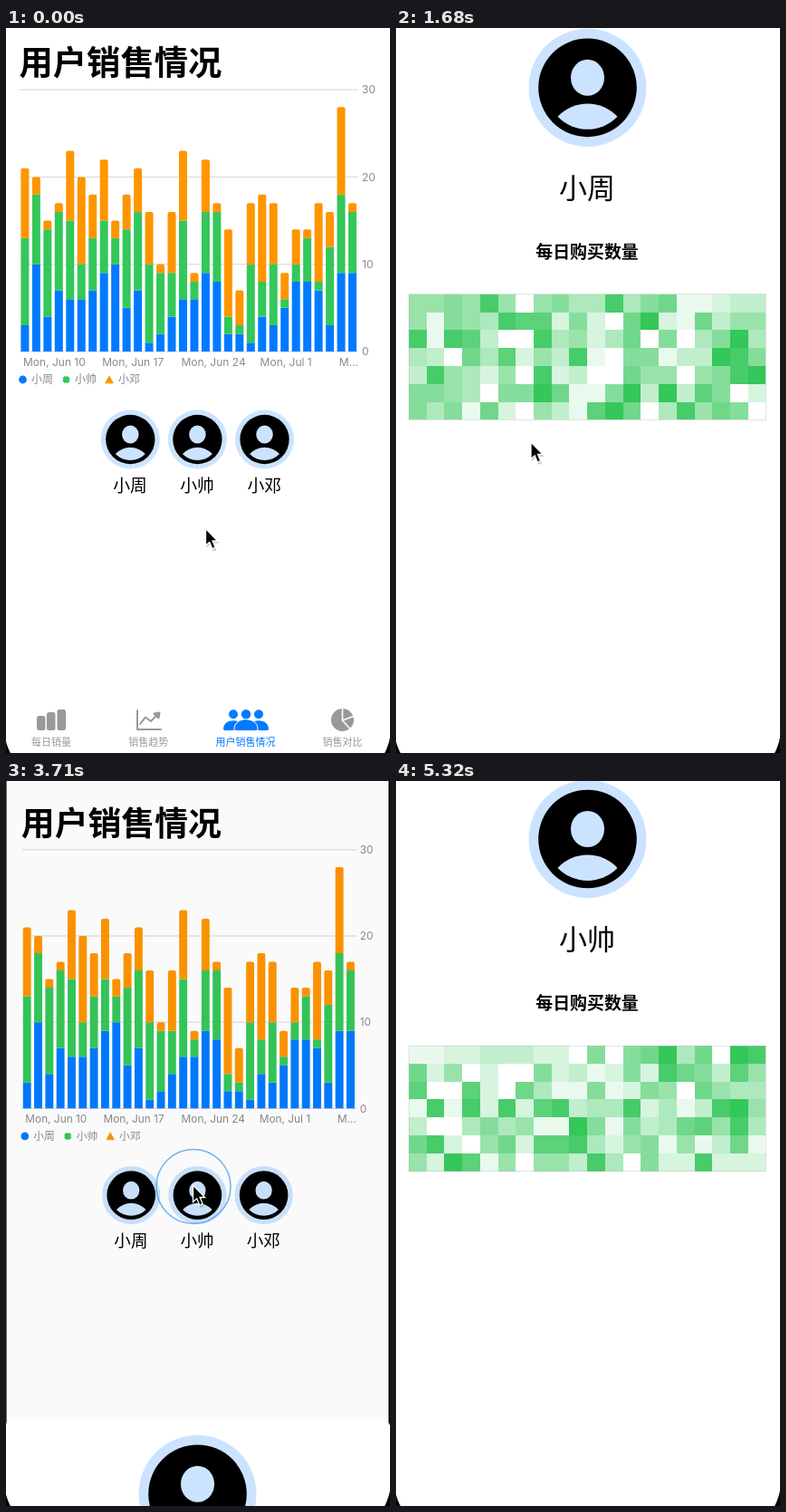
Write an HTML page that moves like this. It is 424 px wide and 800 px high and loops after 5.81 s.

```html
<!DOCTYPE html>
<html lang="zh-CN">
<head>
<meta charset="utf-8">
<title>用户销售情况</title>
<style>
html, body { margin: 0; width: 100%; height: 100%; overflow: hidden; background: #000; }
svg { display: block; width: 100vw; height: 100vh; }
text { font-family: "Noto Sans CJK SC", "Noto Sans CJK", "Noto Sans", sans-serif; }
.axis { font: 12px Inter, sans-serif; fill: #8a8a8e; }
.small { font-size: 12px; fill: #8a8a8e; }
.mid { text-anchor: middle; }
</style>
</head>
<body>
<svg viewBox="0 0 424 800" xmlns="http://www.w3.org/2000/svg">
  <defs>
    <g id="avatar">
      <circle r="65" fill="#cce3ff"/>
      <circle r="54.3"/>
      <ellipse cy="-11" rx="18.5" ry="20" fill="#cce3ff"/>
      <path d="M-33 32A45 45 0 0 1 33 32A46 46 0 0 1 -33 32Z" fill="#cce3ff"/>
    </g>
    <path id="body" d="M-11 0C-11 -12.5 11 -12.5 11 0Q11 1.5 9 1.5H-9Q-11 1.5 -11 0Z"/>
  </defs>
  <rect width="424" height="800"/>
  <g id="main">
    <rect x="-2" y="-98" width="427" height="930" rx="12" fill="#fff"/>
    <text x="14.5" y="52" font-size="37.3" font-weight="600">用户销售情况</text>
    <g id="chart"></g>
    <g id="legend">
      <circle cx="18.5" cy="388" r="4.4" fill="#007aff"/>
      <path d="M63.7 385.2l5.6 5.6m0-5.6l-5.6 5.6" stroke="#34c759" stroke-width="4.2"/>
      <path d="M114 384.2l4.2 7.6h-8.4z" fill="#ff9500" stroke="#ff9500" stroke-linejoin="round"/>
    </g>
    <g id="people"></g>
    <g id="tabs" fill="#999">
      <rect x="34" y="759" width="9.5" height="16" rx="2.5"/>
      <rect x="45" y="755" width="9.5" height="20" rx="2.5"/>
      <rect x="56.5" y="752" width="9.5" height="23" rx="2.5"/>
      <g fill="none" stroke="#999" stroke-width="2" stroke-linecap="round" stroke-linejoin="round">
        <path d="M145 753V774H171M148 768L154 760.5L160 765L167 757.5"/>
        <path d="M163.5 756.5l6-1l-1 6z" fill="#999"/>
      </g>
      <g id="tint">
        <circle cx="251" cy="757.3" r="5"/>
        <circle cx="279" cy="757.3" r="5"/>
        <use href="#body" x="251" y="773.5"/>
        <use href="#body" x="279" y="773.5"/>
        <g stroke="#fff" stroke-width="1.6" paint-order="stroke">
          <circle cx="265" cy="757.3" r="5.2"/>
          <use href="#body" transform="translate(265 773.5) scale(1.14 1.08)"/>
        </g>
      </g>
      <circle cx="371.5" cy="763.5" r="12.5"/>
      <path d="M371.5 750V764L380.5 774M371.5 764L385 759" fill="none" stroke="#fff" stroke-width="1.6"/>
    </g>
    <rect id="dim" x="-2" y="-98" width="427" height="930" rx="12" opacity="0"/>
  </g>
  <g id="sheet">
    <rect x="-2" width="427" height="1000" rx="12" fill="#fff"/>
    <use href="#avatar" x="211.5" y="83"/>
    <text id="name" class="mid" x="211" y="205" font-size="31"></text>
    <text class="mid" x="211" y="271" font-size="18.9" font-weight="600">每日购买数量</text>
    <g id="heat"></g>
  </g>
  <path d="M-2 772A60 60 0 0 0 58 832H365A60 60 0 0 0 425 772V840H-2Z"/>
  <circle id="ring" fill="none" stroke="#2387ea"/>
  <g id="cursor">
    <path d="M1 2V21L5 17.5L8 25L12 23.5L9 16H15Z" opacity=".2"/>
    <path d="M0 0V18.5L4.2 14.8L7.2 22L10.6 20.6L7.6 13.5H13.2Z" stroke="#fff" stroke-width="1.3"/>
  </g>
</svg>
<script>
const LOOP = 5810, STEP = 70;
const NS = "http://www.w3.org/2000/svg";
const $ = id => document.getElementById(id);

function add(parent, tag, attrs, text) {
  const el = document.createElementNS(NS, tag);
  for (const k in attrs) el.setAttribute(k, attrs[k]);
  if (text) el.textContent = text;
  parent.appendChild(el);
  return el;
}

const names = ["小周", "小帅", "小邓"];

// Daily sales per person, stacked bottom to top
const sales = [
  [3,10,4,7,6,6,7,9,10,5,7,1,2,4,6,6,9,8,2,2,1,4,3,5,8,8,7,3,9,9],
  [10,8,10,9,9,4,6,6,3,9,9,9,7,5,9,2,7,8,2,1,9,4,7,1,2,5,1,9,9,7],
  [8,2,1,1,8,10,5,7,2,4,5,6,1,7,8,1,6,1,10,4,7,10,7,3,4,1,9,4,10,1]
];

function buildChart() {
  const g = $("chart"), colors = ["#007aff", "#34c759", "#ff9500"];
  const y = v => 357 - v * 9.63;
  for (const v of [0, 10, 20, 30]) {
    add(g, "path", { d: `M15 ${y(v)}H389`, stroke: "#d6d6d8" });
    add(g, "text", { class: "axis", x: 393, y: y(v) + 4.3 }, String(v));
  }
  for (let i = 0; i < 30; i++) {
    const x = 16.4 + i * 12.47, w = 9;
    let sum = 0;
    sales.forEach((list, k) => {
      const low = y(sum), top = y(sum += list[i]), r = k === 2 ? 2 : 0;
      add(g, "path", {
        d: `M${x} ${low}V${top + r}q0 ${-r} ${r} ${-r}H${x + w - r}q${r} 0 ${r} ${r}V${low}Z`,
        fill: colors[k]
      });
    });
  }
  ["Mon, Jun 10", "Mon, Jun 17", "Mon, Jun 24", "Mon, Jul 1", "M…"].forEach((s, i) =>
    add(g, "text", { class: "axis", x: 19 + i * 87.2, y: 373 }, s));
}

function buildPeople() {
  names.forEach((s, i) => {
    const x = 137.3 + i * 74.1;
    add($("people"), "use", { href: "#avatar", transform: `translate(${x} 454) scale(.5)` });
    add($("people"), "text", { class: "mid", x: x - 0.3, y: 512, "font-size": 18.8 }, s);
    add($("legend"), "text", { class: "small", x: 28 + i * 48, y: 392.4 }, s);
  });
  ["每日销量", "销售趋势", "用户销售情况", "销售对比"].forEach((s, i) =>
    add(i === 2 ? $("tint") : $("tabs"), "text",
      { class: "mid", x: 50 + i * 107.2, y: 792, "font-size": 11, "font-weight": 500 }, s));
}

function random(seed) {
  return () => {
    seed = (seed + 0x6d2b79f5) | 0;
    let n = Math.imul(seed ^ (seed >>> 15), seed | 1);
    n ^= n + Math.imul(n ^ (n >>> 7), n | 61);
    return ((n ^ (n >>> 14)) >>> 0) / 4294967296;
  };
}

// Daily purchases, 0 to 10, seven weekdays by twenty weeks
function buildHeat(seed) {
  const w = 19.72, h = 19.8, next = random(seed);
  const g = add($("heat"), "g", { "shape-rendering": "crispEdges" });
  for (let i = 0; i < 140; i++) {
    const level = Math.floor(11 * next() ** 1.15);
    add(g, "rect", {
      x: 14 + (i % 20) * w, y: 311 + Math.floor(i / 20) * h, width: w, height: h,
      fill: "#34c759", "fill-opacity": level / 10
    });
  }
  add(g, "rect", {
    x: 14, y: 311, width: w * 20, height: h * 7,
    fill: "none", stroke: "#bbb", "stroke-opacity": 0.6, "stroke-width": 0.7
  });
  return g;
}

// Critically damped spring from 0 to 1
function spring(ms) {
  const u = Math.max(0, ms) * 0.01826;
  return 1 - (1 + u) * Math.exp(-u);
}

const OPEN = 1221, CLOSE = 2578, SWAP = 3500, REOPEN = 3672;

function sheetLevel(t) {
  if (t < CLOSE) return spring(t - OPEN);
  if (t < SWAP) return 1 - spring(t - CLOSE);
  return spring(t - REOPEN);
}

// time, x, y of the pointer tip
const path = [
  [0, 220.5, 552.5], [540, 220.5, 552.5], [1110, 149, 457], [2480, 149, 457],
  [2600, 162, 604], [2800, 177, 601], [3060, 184, 590], [3530, 206.5, 446],
  [4790, 206.5, 446], [5270, 250, 835], [LOOP, 250, 835]
];

function pointer(t) {
  let i = 1;
  while (path[i][0] < t) i++;
  const [t0, x0, y0] = path[i - 1], [t1, x1, y1] = path[i];
  const u = (t - t0) / (t1 - t0), e = u * u * (3 - 2 * u);
  return [x0 + (x1 - x0) * e, y0 + (y1 - y0) * e];
}

// time, x, y of each press
const clicks = [[1120, 150, 460], [2568, 162, 605], [3532, 207, 447.5]];

function drawRing(t) {
  const hit = clicks.find(c => t >= c[0] && t < c[0] + 300);
  const ring = $("ring");
  ring.style.display = hit ? "" : "none";
  if (!hit) return;
  const a = (t - hit[0]) / 300, rest = 1 - a;
  ring.setAttribute("cx", hit[1]);
  ring.setAttribute("cy", hit[2]);
  ring.setAttribute("r", 44 * (1 - rest ** 3));
  ring.setAttribute("stroke-width", 0.7 + 5.3 * rest * rest);
  ring.setAttribute("opacity", 1 - 0.65 * a);
}

buildChart();
buildPeople();
const heats = [buildHeat(11), buildHeat(29)];

function draw(t) {
  const p = sheetLevel(t), who = t < SWAP ? 0 : 1;
  $("main").setAttribute("transform",
    `translate(211.5 ${56 * p}) scale(${1 - 0.0788 * p}) translate(-211.5 0)`);
  $("dim").setAttribute("opacity", 0.126 * p);
  $("tint").setAttribute("fill", p > 0.02 ? "#999" : "#007aff");
  $("sheet").setAttribute("transform", `translate(0 ${835 - 854 * p})`);
  $("name").textContent = names[who];
  heats.forEach((g, i) => { g.style.display = i === who ? "" : "none"; });
  $("cursor").setAttribute("transform", `translate(${pointer(t)})`);
  drawRing(t);
}

const start = performance.now();
function tick() {
  const t = (performance.now() - start) % LOOP;
  draw(Math.floor(t / STEP) * STEP);
  requestAnimationFrame(tick);
}
tick();
</script>
</body>
</html>
```
